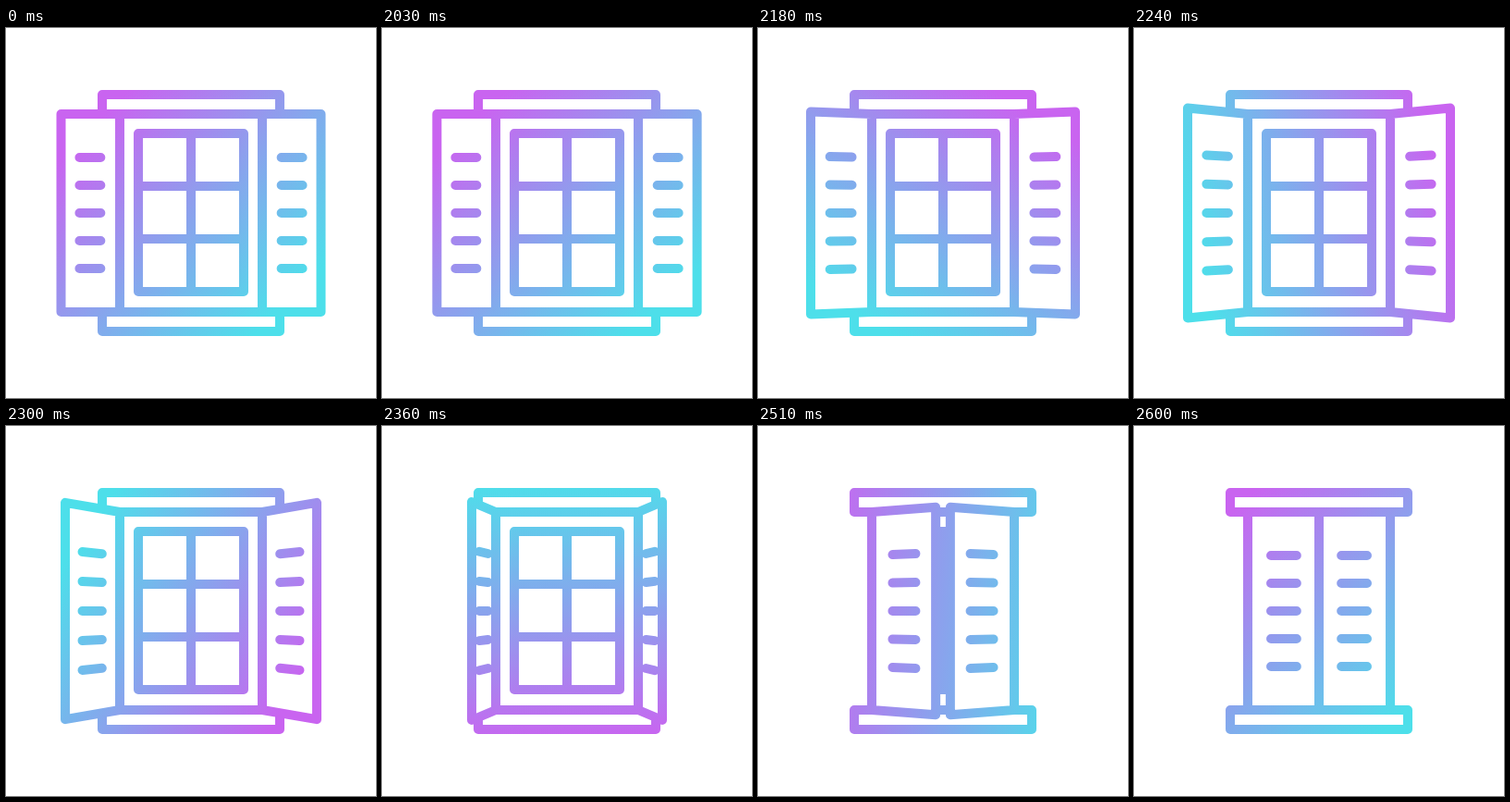
These frames come from a looping animation (400x400 px, 2660 ms). An HTML page:

```html
<!DOCTYPE html>
<html lang="en">
<head>
<meta charset="utf-8">
<title>Window shutters</title>
<style>
  html, body { margin: 0; width: 100%; height: 100%; overflow: hidden; background: #fff; }
  svg { display: block; width: 100%; height: 100%; }
</style>
</head>
<body>
<svg viewBox="0 0 400 400">
  <defs>
    <linearGradient id="tint" gradientUnits="userSpaceOnUse">
      <stop offset="0" stop-color="#c964f0"/>
      <stop offset="1" stop-color="#4ddfea"/>
    </linearGradient>
  </defs>
  <g fill="none" stroke="url(#tint)" stroke-width="10" stroke-linecap="round" stroke-linejoin="round">
    <path d="M104 72H296V93H104ZM104 307H296V328H104Z"/>
    <path d="M123 93H277V307H123Z"/>
    <path d="M143 114H257V285H143ZM200 114V285M143 171H257M143 228H257"/>
    <path id="leftPanel" fill="#fff"/>
    <path id="leftSlats"/>
    <path id="rightPanel" fill="#fff"/>
    <path id="rightSlats"/>
  </g>
</svg>
<script>
const LOOP = 2660, HOLD = 2030, STEP = 30, LAST_STEP = 20;
const CENTER = 200, HINGE = 123, HALF_HEIGHT = 107, TINT_RADIUS = 142;
const SLAT_OFFSETS = [-60, -30, 0, 30, 60];

// Keys are [step, value] pairs.
const edgeX = curve([[0, 59.5], [3, 58.8], [6, 57], [8, 58], [10, 64], [12, 97], [15, 166], [18, 198], [20, 200]]);
const flare = curve([[0, 0], [2, 0.001], [6, 0.024], [10, 0.095], [12, 0.103], [15, 0.107], [18, 0.019], [20, 0]]);
const tintTurn = curve([[0, 0], [1, 3], [6, 77], [10, 169], [12, 222], [15, 281], [20, 360]]);

// Smooth monotone interpolation, at rest at both ends.
function curve(keys) {
  const slope = i => (keys[i + 1][1] - keys[i][1]) / (keys[i + 1][0] - keys[i][0]);
  const tangent = keys.map((_, i) => {
    if (i === 0 || i === keys.length - 1) return 0;
    const a = slope(i - 1), b = slope(i);
    return a * b > 0 ? 2 * a * b / (a + b) : 0;
  });
  return t => {
    let i = 0;
    while (i < keys.length - 2 && t > keys[i + 1][0]) i++;
    const [t0, v0] = keys[i], [t1, v1] = keys[i + 1];
    const d = t1 - t0, u = (t - t0) / d, r = 1 - u;
    return v0 * r * r * (1 + 2 * u) + v1 * u * u * (3 - 2 * u)
      + d * u * r * (tangent[i] * r - tangent[i + 1] * u);
  };
}

const byId = id => document.getElementById(id);

function drawShutter(side, mirror, edge, stretch) {
  // depth runs from 0 at the hinge to 1 at the free edge
  const point = (depth, dy) => {
    const x = HINGE + depth * (edge - HINGE);
    const y = CENTER + dy * (1 + depth * stretch);
    return `${(mirror ? 2 * CENTER - x : x).toFixed(2)} ${y.toFixed(2)}`;
  };
  const corners = [point(0, -HALF_HEIGHT), point(1, -HALF_HEIGHT), point(1, HALF_HEIGHT), point(0, HALF_HEIGHT)];
  byId(side + "Panel").setAttribute("d", `M${corners.join("L")}Z`);
  byId(side + "Slats").setAttribute("d",
    SLAT_OFFSETS.map(dy => `M${point(0.325, dy)}L${point(0.686, dy)}`).join(""));
}

function turnTint(degrees) {
  const angle = (degrees - 135) * Math.PI / 180;
  const dx = TINT_RADIUS * Math.cos(angle), dy = TINT_RADIUS * Math.sin(angle);
  const ends = { x1: CENTER + dx, y1: CENTER + dy, x2: CENTER - dx, y2: CENTER - dy };
  for (const name in ends) byId("tint").setAttribute(name, ends[name].toFixed(2));
}

function draw(ms) {
  const step = ms < HOLD ? 0 : Math.min(LAST_STEP, Math.floor((ms - HOLD) / STEP) + 1);
  drawShutter("left", false, edgeX(step), flare(step));
  drawShutter("right", true, edgeX(step), flare(step));
  turnTint(tintTurn(step));
}

const start = performance.now();
function tick() {
  draw((performance.now() - start) % LOOP);
  requestAnimationFrame(tick);
}
tick();
</script>
</body>
</html>
```
